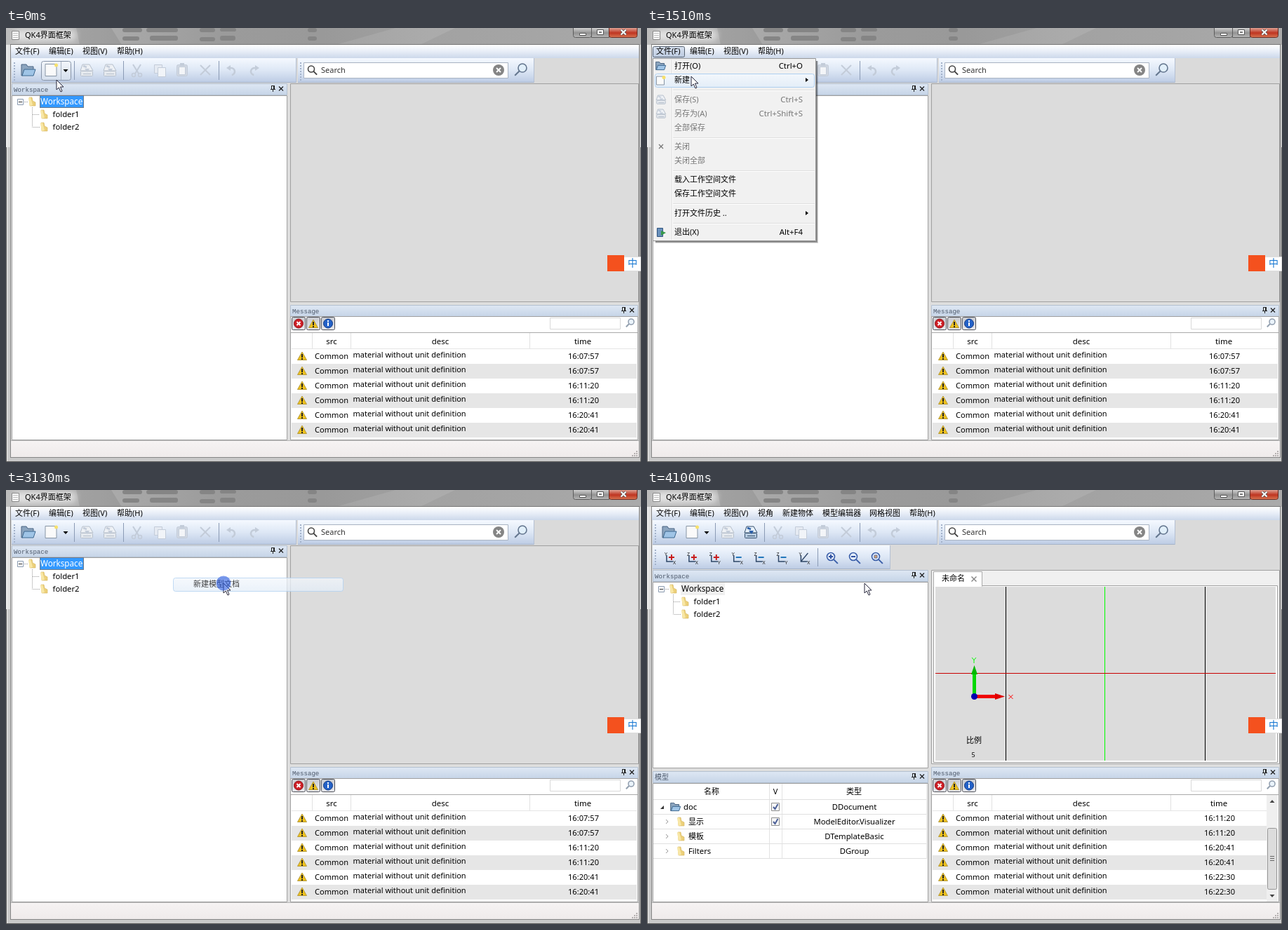
Recreate the animation shown at these times as an HTML page with a canvas. Size 905 by 619 pixels, loop 4910 ms.

```html
<!DOCTYPE html>
<html lang="zh-CN">
<head>
<meta charset="utf-8">
<title>QK4界面框架</title>
<style>
html, body { margin: 0; width: 100%; height: 100%; overflow: hidden; }
canvas { display: block; }
</style>
</head>
<body>
<canvas id="stage" width="905" height="619"></canvas>
<script>
const c = document.getElementById('stage').getContext('2d');
const LOOP = 4910;
const SANS = '"Noto Sans","Noto Sans CJK SC","Noto Sans CJK",sans-serif';
const MONO = '"Liberation Mono","Noto Sans CJK SC",monospace';
const OFF = '#c3ccd9', BLUE = '#2b5fa8', EDGE = '#a0a0a0';

// Drawing helpers
function fade(y, h, ...colors) {
  const g = c.createLinearGradient(0, y, 0, y + h);
  colors.forEach((k, i) => g.addColorStop(i / (colors.length - 1), k));
  return g;
}
function box(x, y, w, h, fill, stroke, r = 0) {
  c.beginPath();
  c.roundRect(stroke ? x + .5 : x, stroke ? y + .5 : y, stroke ? w - 1 : w, stroke ? h - 1 : h, r);
  if (fill) { c.fillStyle = fill; c.fill(); }
  if (stroke) { c.strokeStyle = stroke; c.lineWidth = 1; c.stroke(); }
}
function path(points, stroke, width = 1, fill) {
  c.beginPath();
  for (let i = 0; i < points.length; i += 2) c.lineTo(points[i], points[i + 1]);
  if (fill) { c.closePath(); c.fillStyle = fill; c.fill(); }
  if (stroke) { c.strokeStyle = stroke; c.lineWidth = width; c.stroke(); }
}
const vline = (x, y, y2, color) => box(x, y, 1, y2 - y, color);
const hline = (x, y, x2, color) => box(x, y, x2 - x, 1, color);
function disc(x, y, r, fill, stroke, width = 1) {
  c.beginPath();
  c.arc(x, y, r, 0, 7);
  if (fill) { c.fillStyle = fill; c.fill(); }
  if (stroke) { c.strokeStyle = stroke; c.lineWidth = width; c.stroke(); }
}
function text(s, x, y, color = '#000', align = 'left', size = 11, font = SANS) {
  c.font = size + 'px ' + font;
  c.textAlign = align;
  c.fillStyle = color;
  c.fillText(s, x, y + 4);
}
function cross(x, y, r, color, width = 1.3) {
  path([x - r, y - r, x + r, y + r], color, width);
  path([x + r, y - r, x - r, y + r], color, width);
}
const arrow = (x, y, color = '#000') => path([x, y - 3, x + 4, y, x, y + 3], null, 1, color);
const dropArrow = (x, y, color = '#000') => path([x - 3.5, y - 2, x + 3.5, y - 2, x, y + 2], null, 1, color);
function lens(x, y, r, color, side = 1, fill) {
  path([x + side * r * .7, y + r * .7, x + side * r * 1.8, y + r * 1.8], color, 2);
  disc(x, y, r, fill, color, 1.6);
}

// Icons, centred on x, y
function folder(x, y) {
  path([x - 4, y - 6, x, y - 6, x + 1, y - 1, x + 5, y + 1, x + 5, y + 6, x - 3, y + 6], '#d3b45c', .6, '#ecd07a');
  path([x - 5, y - 5, x - 2, y - 6, x + 1, y + 5, x - 3, y + 6], null, 1, '#f8e7a6');
}
function openFolder(x, y, s = 1) {
  path([x - 9 * s, y + 8 * s, x - 9 * s, y - 8 * s, x - 2 * s, y - 8 * s, x, y - 5 * s, x + 8 * s, y - 5 * s, x + 8 * s, y + 5 * s], '#4b6582', 1, '#8ca5bf');
  path([x - 8 * s, y + 8 * s, x - 5 * s, y - s, x + 11 * s, y - s, x + 8 * s, y + 8 * s], '#3d6890', 1, '#9fc4e6');
}
function page(x, y, w, h) {
  box(x - w / 2, y - h / 2, w, h, '#fafafa', '#8795a5');
  disc(x + w / 2 - 1, y - h / 2 + 2, 2.5, '#f7e16d');
}
function saveIcon(x, y, on, s = 1) {
  const ink = on ? '#36516e' : '#b7c0cc';
  path([x - 6 * s, y - 8 * s, x + 4 * s, y - 8 * s, x + 9 * s, y + s, x - 9 * s, y + s], ink, 1, on ? '#e6f0fa' : '#eef1f5');
  box(x - 9 * s, y + s, 18 * s, 8 * s, on ? '#b7cbe0' : '#e5e9ee', ink, 1);
  path([x - 5 * s, y - 6 * s, x, y - 4 * s], on ? BLUE : OFF, 2.5 * s);
  path([x - 3 * s, y - 2 * s, x + 4 * s, y - 2 * s, x + s, y + 3 * s], null, 1, on ? BLUE : OFF);
  hline(x - 5 * s, Math.round(y + 5 * s), x + 6 * s, ink);
}
function warning(x, y) {
  path([x, y - 6, x + 6.5, y + 5.5, x - 6.5, y + 5.5], '#b59a3a', 1, '#f0c21c');
  box(x - 1, y - 3, 2, 5, '#222');
  box(x - 1, y + 3, 2, 2, '#222');
}
function axes(x, y, up, right, sign) {
  path([x - 4, y - 3, x - 4, y + 6, x + 5, y + 6], '#2d4566', 1.5);
  text(up, x - 5, y - 6, '#222', 'center', 7);
  text(right, x + 7, y + 6, '#222', 'center', 7);
  if (!sign) return path([x - 4, y + 6, x + 6, y - 6], '#2d4566', 1.3);
  const color = sign > 0 ? '#c81c1c' : '#2277bb';
  box(x - 1, y - 1, 8, 2, color);
  if (sign > 0) box(x + 2, y - 4, 2, 8, color);
}
function pointer(x, y) {
  path([x, y, x, y + 14, x + 3.3, y + 11, x + 6, y + 17, x + 8, y + 16, x + 5.5, y + 10, x + 10, y + 10], '#25253a', 1, '#fff');
}

// Window parts
function frame() {
  const g = c.createLinearGradient(0, 0, 905, 0);
  ['#bdbdbd', '#aaa', '#9b9b9b', '#999', '#a2a2a2', '#a5a5a5', '#aaa'].forEach((k, i) => g.addColorStop(i / 6, k));
  box(0, 0, 905, 619, '#c9c9c9');
  box(0, 0, 905, 24, g);
  for (const [x, y, w, h] of [[166, 0, 28, 6], [166, 12, 24, 6], [200, 0, 45, 6], [205, 11, 40, 7], [276, 0, 22, 6], [276, 13, 22, 6], [305, 0, 23, 5], [305, 11, 22, 7], [430, 0, 13, 6], [430, 12, 13, 6]])
    box(x, y, w, h, '#858585', null, 3);
  path([555, 0, 640, 0, 590, 24, 470, 24], null, 1, '#ffffff18');
  path([100, 0, 150, 0, 165, 24, 105, 24], null, 1, '#00000014');
  c.save();
  c.filter = 'blur(5px)';
  box(12, 3, 88, 15, '#ffffffa0', null, 7);
  c.restore();
  box(0, 24, 7, 146, '#e4e4e4');
  vline(0, 170, 619, '#555');
  vline(1, 24, 618, '#eee');
  vline(6, 24, 613, '#858585');
  vline(902, 24, 613, '#858585');
  vline(904, 170, 619, '#666');
  hline(6, 612, 903, '#858585');
  hline(0, 618, 905, '#555');
  hline(6, 23, 903, '#777');
  box(8, 4, 11, 13, '#fafafa', '#888');
  for (const y of [7, 10, 13]) hline(10, y, 17, '#bbb');
  text('QK4界面框架', 27, 10);
  box(808, -4, 27, 18, fade(0, 14, '#d0d0d0', '#929292', '#bbb'), '#5c5c5c', 3);
  box(834, -4, 26, 18, fade(0, 14, '#d0d0d0', '#929292', '#bbb'), '#5c5c5c');
  box(859, -4, 41, 18, fade(0, 14, '#dda092', '#bf3420', '#d97b57'), '#6b2d25', 3);
  box(817, 7, 10, 4, '#fff', '#555');
  box(842, 2, 10, 8, '#fff', '#555');
  box(845, 5, 4, 2, '#777');
  cross(880, 6, 3.5, '#555', 3.6);
  cross(880, 6, 3.5, '#fff', 2);
}
function menuBar(doc, hot) {
  box(7, 24, 895, 19, fade(24, 19, '#fff', '#e7edf7', '#ccd8ea'));
  if (hot) box(8, 26, 46, 16, fade(26, 16, '#d9e2f0', '#bac9df'), '#55606f', 2);
  [['文件(F)', 13], ['编辑(E)', 61], ['视图(V)', 109]].forEach(([s, x]) => text(s, x, 33));
  if (doc) [['视角', 158], ['新建物体', 193], ['模型编辑器', 250], ['网格视图', 317]].forEach(([s, x]) => text(s, x, 33));
  text('帮助(H)', doc ? 374 : 158, 33);
}
function strip(x, y, w, h) {
  box(x, y, w, h, fade(y, h, '#f5f9ff', '#dde7f5', '#bccbe4'));
  hline(x, y + h - 1, x + w, '#a4b2c8');
  vline(x + w - 1, y, y + h, '#b4c0d3');
  for (let d = 6; d < h - 4; d += 4) box(x + 3, y + d, 2, 2, '#a3b2ca');
}
function toolBar(search, hover, saved) {
  box(7, 43, 895, 36, '#dadada');
  strip(8, 43, 406, 35);
  strip(416, 43, 337, 35);
  openFolder(31, 60);
  if (hover) {
    box(50, 47, 43, 28, fade(47, 28, '#f3f6fb', '#d4deec'), '#8794a8', 3);
    vline(78, 48, 74, '#a9b4c4');
  }
  page(64, 60, 17, 18);
  dropArrow(85, 61);
  for (const x of [97, 167, 303]) vline(x, 47, 74, '#8b9bb5');
  saveIcon(115, 60, false);
  saveIcon(148, 60, saved);
  path([181, 52, 189, 65], OFF, 2);
  path([192, 52, 184, 65], OFF, 2);
  disc(182, 67, 2.5, null, OFF, 1.6);
  disc(191, 67, 2.5, null, OFF, 1.6);
  box(211, 52, 12, 13, '#e5eaf2', OFF);
  box(216, 56, 12, 14, '#f1f4f8', OFF);
  box(243, 52, 16, 17, '#d0d7e2', OFF, 2);
  box(246, 55, 10, 12, '#f3f5f8', OFF);
  box(248, 50, 6, 4, OFF);
  cross(284, 60, 7, OFF, 2);
  for (const [x, d] of [[321, -1], [354, 1]]) {
    c.beginPath();
    c.arc(x, 62, 5, d < 0 ? -2 : -1.1, d < 0 ? 1.4 : 1.7, d > 0);
    c.strokeStyle = OFF; c.lineWidth = 2.5; c.stroke();
    path([x + d * 7, 57, x + d, 53, x + d, 61], null, 1, OFF);
  }
  box(424, 49, 292, 23, '#fff', '#a9b3c2');
  if (search) {
    lens(435, 58.5, 4.5, '#444');
    text('Search', 449, 60, '#333');
    disc(702, 60, 8, '#858585');
    cross(702, 60, 3, '#fff', 1.8);
  }
  lens(736, 57, 6, '#64768e', -1, '#e1effa');
}
function viewBar() {
  box(7, 79, 895, 35, '#dadada');
  strip(8, 79, 339, 34);
  ['YX', 'ZX', 'ZY', 'YX', 'ZX', 'ZY', 'YX'].forEach((s, i) => axes(32 + i * 31.9, 96, s[0], s[1], i < 3 ? 1 : i < 6 ? -1 : 0));
  vline(243, 83, 109, '#8b9bb5');
  for (const x of [262, 294, 326]) {
    lens(x, 95, 5.5, '#3b5fa9', 1, '#e5effc');
    if (x < 320) box(x - 3, 94, 6, 2, '#2e50a0');
    else box(x - 2.5, 92.5, 5, 5, '#d9a468', '#5d6b9b');
    if (x < 270) box(x - 1, 92, 2, 6, '#2e50a0');
  }
}
function caption(s, x, y, w) {
  box(x, y, w, 17, fade(y, 17, '#dfe8f4', '#c5d4e7'), '#b4c1d1');
  text(s, x + 3, y + 7.5, '#4d596b', 'left', s === '模型' ? 10 : 9.15, MONO);
  const px = x + w - 22, py = y + 3;
  hline(px - 2, py + 5, px + 5, '#222');
  vline(px - 1, py, py + 5, '#222');
  box(px + 2, py, 2, 5, '#222');
  hline(px - 1, py, px + 4, '#222');
  vline(px + 1, py + 5, py + 9, '#222');
  cross(x + w - 9, y + 7.5, 3, '#222');
}
function tree(y, selected) {
  c.setLineDash([1, 1]);
  path([24, y + .5, 32, y + .5], '#999');
  path([37.5, y + 8, 37.5, y + 36.5, 48, y + 36.5], '#999');
  path([38, y + 18.5, 48, y + 18.5], '#999');
  c.setLineDash([]);
  box(16, y - 4, 9, 9, '#fff', '#8a9bb0');
  hline(18, y, 23, '#333');
  folder(37, y);
  box(48, y - 9, 63, 18, selected ? '#3399ff' : '#f0f0f0');
  if (selected) {
    c.setLineDash([1, 1]);
    box(48, y - 9, 63, 18, null, '#b05a10');
    c.setLineDash([]);
  }
  text('Workspace', 49, y, selected ? '#fff' : '#000', 'left', 11.7);
  for (const i of [1, 2]) {
    folder(54, y + i * 18);
    text('folder' + i, 66.5, y + i * 18, '#000', 'left', 11.3);
  }
}
function modelPanel() {
  caption('模型', 8, 401, 393);
  box(8, 418, 393, 170, '#fff', EDGE);
  [['名称', 92], ['V', 183], ['类型', 295]].forEach(([s, x]) => text(s, x, 430, '#000', 'center'));
  for (const x of [174, 192, 398]) vline(x, 419, 525, '#e3e3e3');
  const rows = [['doc', 'DDocument'], ['显示', 'ModelEditor.Visualizer'], ['模板', 'DTemplateBasic'], ['Filters', 'DGroup']];
  hline(9, 441, 399, '#e0e0e0');
  rows.forEach(([name, type], i) => {
    const y = 452 + i * 21;
    if (i) {
      path([27, y - 3, 30, y, 27, y + 3], '#999');
      folder(48, y);
    } else {
      path([24, y - 2, 24, y + 3, 19, y + 3], null, 1, '#333');
      openFolder(40, y, .7);
    }
    text(name, i ? 59 : 52, y, '#000', 'left', i === 1 || i === 2 ? 11 : 11.3);
    text(type, 295.5, y, '#000', 'center', 11.3);
    if (i < 2) {
      box(177, y - 6, 12, 12, '#f6f6f6', '#8e8f8f');
      path([180, y, 182.5, y + 3, 186.5, y - 4], '#4b5f97', 2);
    }
    hline(9, y + 10, 399, '#e0e0e0');
  });
}
function drawing() {
  box(405, 114, 497, 277, '#f0f0f0', EDGE);
  box(408, 136, 491, 253, '#fff', EDGE);
  box(411, 138, 485, 248, '#dcdcdc');
  box(408, 116, 70, 22, '#fff', '#aaa');
  box(409, 130, 68, 8, '#fff');
  text('未命名', 420, 126);
  cross(466, 127, 3.5, '#888', 1.5);
  vline(511, 138, 386, '#000');
  vline(795, 138, 386, '#000');
  vline(652, 138, 386, '#00ff00');
  hline(411, 261, 896, '#c80000');
  box(464, 262, 5, 32, '#00d800');
  path([466.5, 250, 471, 263, 462, 263], null, 1, '#00b800');
  box(466, 292, 32, 5, '#f00000');
  path([510, 294.5, 496, 290, 496, 299], null, 1, '#e00000');
  disc(466.5, 294.5, 4.5, '#0000b0');
  cross(518.5, 295, 3, '#f00', 1);
  path([463, 239, 466, 242.5, 469, 239], '#0f0');
  vline(465.5, 242, 247, '#0f0');
  text('比例', 466, 357, '#000', 'center');
  text('5', 465, 377, '#000', 'center', 9);
}
function messages(scrolled) {
  caption('Message', 405, 395, 496);
  box(405, 411, 496, 177, '#fff', EDGE);
  for (const x of [407, 428, 449]) box(x, 412, 20, 19, fade(412, 19, '#c9cbd1', '#e8e9ed'), '#4e5058', 2);
  disc(417, 421.5, 6.5, '#cf1f26', '#8f1018');
  cross(417, 421.5, 2.5, '#fff', 2);
  warning(438, 422);
  disc(459, 421.5, 6.5, '#2462c8', '#123b87');
  box(458, 420, 2, 5, '#fff');
  box(458, 417, 2, 2, '#fff');
  box(775, 413, 101, 17, '#fff', '#d9d9d9');
  lens(891, 419, 4, '#93a0b0', -1, '#eaf3fb');
  hline(406, 434, 900, '#a9a9a9');
  const tx = scrolled ? 815 : 822, right = scrolled ? 883 : 899;
  [['src', 464], ['desc', 619], ['time', tx]].forEach(([s, x]) => text(s, x, 447, '#000', 'center', 11.4));
  for (const x of [436, 491, 746]) vline(x, 435, 457, '#e1e1e1');
  hline(407, 457, right, '#e5e5e5');
  const times = ['16:07:57', '16:11:20', '16:20:41', '16:22:30'];
  for (let i = 0; i < 6; i++) {
    const y = 468 + i * 21;
    if (i % 2) box(407, y - 10, right - 407, 21, '#e6e6e6');
    warning(422, y);
    text('Common', 440, y, '#000', 'left', 11.1);
    text('material without unit definition', 494.5, y - 2);
    text(times[(i >> 1) + (scrolled ? 1 : 0)], tx + 1, y, '#000', 'center', 11.1);
  }
  if (scrolled) {
    box(883, 435, 16, 152, '#efefef');
    dropArrow(891, 579, '#444');
    path([887.5, 446, 894.5, 446, 891, 442], null, 1, '#444');
    box(884, 482, 14, 88, '#dcdcdc', '#979797', 2);
    for (const y of [522, 525, 528]) hline(888, y, 894, '#666');
  }
}
function statusBar() {
  box(7, 588, 895, 24, fade(588, 24, '#f6f3f3', '#efebeb'));
  hline(7, 588, 902, '#b5b5b5');
  for (let i = 0; i < 3; i++) for (let j = 0; j <= i; j++) box(898 - j * 3, 603 + i * 3, 2, 2, '#b5b0b0');
}

// Popup menus
function popup(x, y, w, h) {
  ['#00000080', '#00000060', '#00000028'].forEach((k, i) => {
    vline(x + w + i, y + 4, y + h + i, k);
    hline(x + 4, y + h + i, x + w + i + 1, k);
  });
  box(x, y, w, h, '#f1f1f1', '#979797');
}
const glow = (x, y, w) => box(x, y - 10, w, 20, fade(y - 10, 20, '#f3f7fc', '#e3edf8'), '#aecff0', 3);
const fileItems = [
  [54, '打开(O)', 'Ctrl+O'], [74, '新建 ..', '>'],
  [102, '保存(S)', 'Ctrl+S', 1], [122, '另存为(A)', 'Ctrl+Shift+S', 1], [142, '全部保存', '', 1],
  [169, '关闭', '', 1], [189, '关闭全部', '', 1],
  [216, '载入工作空间文件'], [236, '保存工作空间文件'],
  [264, '打开文件历史 ..', '>'], [291, '退出(X)', 'Alt+F4']];
const newItems = ['新建文本文件', '新建Qpsl交互编辑器', '新建绘图', '新建模型文档', 'OpenTemplate#model_editor ..', '实时场查看器'];
function fileMenu(hotY) {
  popup(8, 43, 233, 261);
  vline(35, 45, 302, '#e0e0e0');
  vline(36, 45, 302, '#fff');
  for (const y of [88, 156, 203, 250, 278]) { hline(37, y, 239, '#dedede'); hline(37, y + 1, 239, '#fff'); }
  if (hotY) glow(11, hotY + 1, 228);
  for (const [y, label, key, off] of fileItems) {
    const ink = off ? '#777' : '#000';
    text(label, 39, y, ink);
    if (key === '>') arrow(226, y);
    else if (key) text(key, 222, y, ink, 'right', 11.4);
  }
  openFolder(19, 54, .7);
  page(19, 75, 12, 13);
  saveIcon(20, 102, false, .75);
  saveIcon(20, 122, false, .75);
  cross(20, 169, 3, '#777', 1.2);
  box(14, 285, 9, 13, '#6990bb', '#31557f');
  path([20, 289, 27, 292, 20, 296], null, 1, '#37994a');
}
function newItem(i, hot) {
  const y = 74 + i * 20;
  if (hot) glow(238, y + 1, 243);
  text(newItems[i], 267, y, '#000', 'left', i === 4 ? 11.25 : 11);
  if (i === 4) arrow(468, y);
}
function newMenu(hot) {
  popup(236, 63, 247, 125);
  vline(263, 65, 186, '#e0e0e0');
  vline(264, 65, 186, '#fff');
  newItems.forEach((_, i) => newItem(i, i === hot));
}

// Pointer moves: start, steps, from, to, easing of x and y
const STEP = 77;
const out = k => 1 - (1 - k) ** 2, inOut = k => k * k * (3 - 2 * k), even = k => k;
const moves = [
  [70, 6, 72, 74, 32, 33, inOut, inOut],
  [1100, 4, 32, 33, 64, 70, out, out],
  [1510, 1, 64, 70, 63, 69, even, even],
  [1960, 7, 63, 69, 300, 88, even, k => k * k],
  [2520, 5, 300, 88, 310, 133, out, out]];
function pointerAt(t) {
  const m = moves.filter(m => t >= m[0]).pop();
  if (!m) return [72, 74];
  const [t0, n, x0, y0, x1, y1, ex, ey] = m;
  const k = Math.min(1, (Math.floor((t - t0) / STEP) + 1) / n);
  return [Math.round(x0 + (x1 - x0) * ex(k)), Math.round(y0 + (y1 - y0) * ey(k))];
}
const during = (t, a, b) => t >= a && t < b;

function draw(t) {
  const [px, py] = pointerAt(t);
  const loading = during(t, 3660, 4020), layout = t >= 3840, doc = t >= 3660;
  const menuOpen = during(t, 550, 3130);
  frame();
  box(7, 43, 895, 569, '#dedede');
  menuBar(doc, menuOpen || t < 550 && py < 43);
  toolBar(!loading, t < 550 && py > 46, t >= 4020);
  const top = layout ? 114 : 79;
  if (layout) viewBar();
  caption('Workspace', 8, top, 393);
  box(8, top + 17, 393, (layout ? 397 : 588) - top - 17, '#fff', EDGE);
  if (!loading) tree(layout ? 141 : 105, !layout);
  if (layout) modelPanel();
  if (t >= 3930) drawing();
  else box(405, top, 497, 391 - top, '#dcdcdc', EDGE);
  messages(t >= 4020);
  statusBar();
  if (!during(t, 3660, 4100)) {
    box(876, 326, 29, 21, '#fff', '#ddd');
    box(857, 324, 24, 23, '#f4511e');
    text('中', 893, 336, '#1677d2', 'center', 14);
  }
  if (menuOpen) {
    c.globalAlpha = t < 650 ? .35 : t < 720 ? .66 : 1;
    fileMenu(t >= 1100 && (py >= 65 ? 74 : py > 43 ? 54 : 0) || (t >= 1660 ? 74 : 0));
    c.globalAlpha = 1;
    if (t >= 1660) newMenu(px > 238 ? Math.floor((py - 65) / 20) : -1);
  } else if (during(t, 3130, 3360)) {
    c.globalAlpha = .75 - Math.floor((t - 3130) / STEP) * .25;
    newItem(3, true);
    c.globalAlpha = 1;
  }
  pointer(px, py);
  if (during(t, 470, 720) || during(t, 1660, 1810) || during(t, 3050, 3210)) disc(px, py, 10.5, '#2a5ae099');
}
function tick() {
  draw(performance.now() % LOOP);
  requestAnimationFrame(tick);
}
tick();
</script>
</body>
</html>
```
